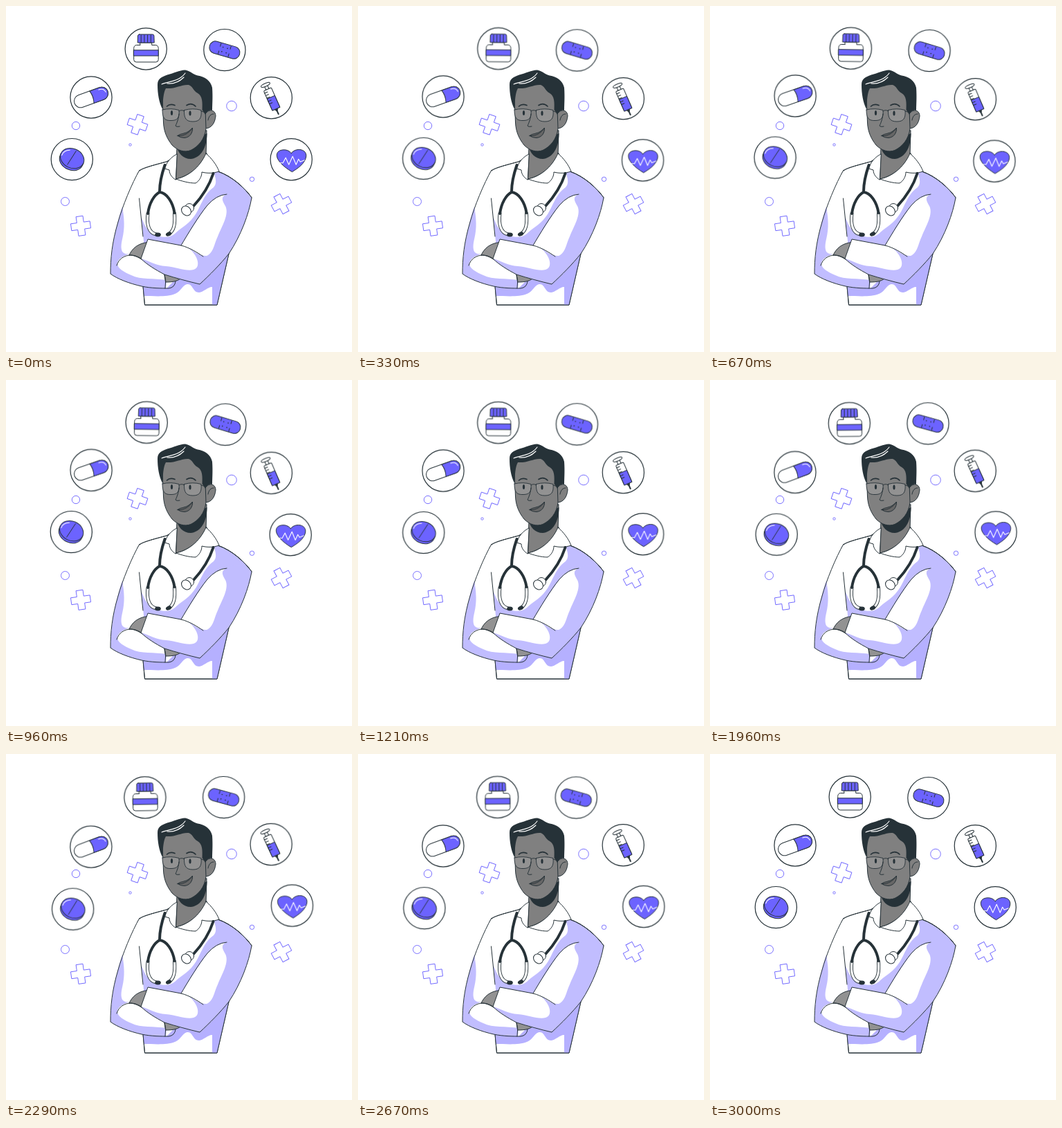
These frames come from a looping animation (500 by 500 pixels, 3040 ms). An HTML page:

```html
<!DOCTYPE html>
<html lang="en">
<head>
<meta charset="utf-8">
<title>Doctor</title>
<style>
  html, body { margin: 0; width: 100%; height: 100%; overflow: hidden; background: #fff; }
  svg { display: block; width: 100%; height: 100%; }
  .line { fill: none; }
  .ink { stroke: #263238; stroke-width: 1; stroke-linecap: round; stroke-linejoin: round; }
  .dark { fill: #263238; }
  .white { fill: #fff; }
  .violet { fill: #6c63ff; }
  .shade { fill: #c1bdff; }
  .deep { fill: #b5b0ff; }
  .skin { fill: #808080; }
  .hand { fill: #929292; }
  .spark { fill: #fff; stroke: #6c63ff; stroke-width: .9; }
  .gleam { fill: none; stroke: #fff; stroke-width: 1.1; stroke-linecap: round; stroke-linejoin: round; }
  .tube { fill: none; stroke: #263238; stroke-width: 4; stroke-linecap: round; }
  .icons { transform-origin: 253.8px 141.8px; animation: sway 3.04s linear infinite; }
  /* a three second swing, then a short rest */
  @keyframes sway {
    0%, 98.684%, 100% { transform: rotate(0deg); }
    24.671% { transform: rotate(1deg); }
    74.013% { transform: rotate(-1deg); }
  }
</style>
</head>
<body>
<svg viewBox="0 0 500 500">
  <defs>
    <path id="cross" d="M-5-14H5V-5H14V5H5V14H-5V5H-14V-5H-5Z"/>
    <circle id="ring" r="30.1" style="stroke-width:1.2"/>
    <path id="torso" d="M232 225C217 229 197 234 193 238C187 246 184 262 190 290L198 405L200.500 432H305L322 358L355 277C346 264 327 246 306 239L289 212L246 217Z"/>
    <clipPath id="inTorso"><use href="#torso"/></clipPath>
  </defs>

  <g class="spark">
    <use href="#cross" transform="translate(190 171.300) rotate(19)"/>
    <use href="#cross" transform="translate(108 317.800) rotate(-8)"/>
    <use href="#cross" transform="translate(398 286) rotate(-28)"/>
    <circle cx="326" cy="144.500" r="7.300"/>
    <circle cx="101" cy="173" r="5.700"/>
    <circle cx="85.500" cy="282.500" r="6"/>
    <circle cx="179.500" cy="200.500" r="1.700"/>
    <circle cx="355.500" cy="250.300" r="3.200"/>
  </g>

  <g class="icons">
    <g transform="translate(95.300 221.600)">
      <use href="#ring" class="white ink"/>
      <g transform="rotate(24)">
        <path class="violet ink" d="M-18-2V1.500C-18 9.500-10 15.500 0 15.500S17.500 9.500 17.500 1.500V-2Z"/>
        <ellipse class="violet ink" cx="-.3" cy="-1.500" rx="17.700" ry="14"/>
      </g>
      <path class="line ink" d="M-6.500 7.500L6-12"/>
      <path class="gleam" d="M-14.500-6C-13-11-8-13.500-3-13.300"/>
    </g>

    <g transform="translate(123 132)">
      <use href="#ring" class="white ink"/>
      <g transform="rotate(-20)">
        <rect class="white ink" x="-25.500" y="-9.300" width="51" height="18.600" rx="9.300"/>
        <path class="violet ink" d="M1-9.300H16.200A9.300 9.300 0 0 1 16.200 9.300H1Q4 0 1-9.300Z"/>
        <path class="gleam" d="M14-6.500C19-6.500 22-4 22.500 0"/>
      </g>
    </g>

    <g transform="translate(202.200 62)">
      <use href="#ring" class="white ink"/>
      <path class="white ink" d="M-8.500-9H8.500V-5.500H14C17-5.500 18-3 18-.5V15.500Q18 19 14.500 19H-14Q-17.500 19-17.500 15.500V-.5C-17.500-3-16.500-5.500-13.500-5.500H-8.500Z"/>
      <path class="violet ink" d="M-17.500 1.800H18V10H-17.500Z"/>
      <path class="violet ink" d="M-9.500-21H9.500Q11.500-21 11.700-19L12-9H-12L-11.700-19Q-11.500-21-9.500-21Z"/>
      <path class="line ink" d="M-7-20V-9.500M-2.300-20V-9.500M2.400-20V-9.500M7.100-20V-9.500"/>
    </g>

    <g transform="translate(315.900 63.600)">
      <use href="#ring" class="white ink"/>
      <g transform="rotate(16)">
        <rect class="violet ink" x="-22.500" y="-8.900" width="45" height="17.800" rx="8.600"/>
        <path class="line ink" stroke-dasharray="4.500 7" d="M-7.500-8V8M7.500-8V8"/>
        <g class="dark">
          <circle cx="-3.300" cy="-3.300" r=".8"/><circle cx="3.300" cy="-3.300" r=".8"/>
          <circle cx="-3.300" cy="3.300" r=".8"/><circle cx="3.300" cy="3.300" r=".8"/>
        </g>
      </g>
    </g>

    <g transform="translate(383.300 132.700)">
      <use href="#ring" class="white ink"/>
      <g transform="rotate(-24)">
        <path class="white ink" d="M-2.300-20H2.300V-13H-2.300Z"/>
        <ellipse class="white ink" cy="-20.500" rx="7" ry="2.200"/>
        <rect class="white ink" x="-6" y="-13.500" width="12" height="31" rx="1.500"/>
        <path class="violet ink" d="M-6-1H6V17.500H-6Z"/>
        <path class="dark ink" d="M-2 18H2L.5 21V26H-.5V21Z"/>
        <path class="line ink" d="M-6-10H-1.500M-6-6H-1.500M-6-2H-1.500M-6 3H-1.500M-6 7H-1.500"/>
      </g>
    </g>

    <g transform="translate(412.200 221.700)">
      <use href="#ring" class="white ink"/>
      <path class="violet ink" d="M0-9C4-14.500 13-16 18.500-12C24-7.500 21.500 0 16.500 6C11.500 12 5 15.500 1.300 18C-5 14.500-14 8-18.500 1C-23-6-21-12-14-13.500C-8-14.700-3-13 0-9Z"/>
      <path class="gleam" d="M-17 5H-12L-8-2.500L-3.500 7.500L2-4.500L7 7.500L10.500-.5L13 3.500L19 1"/>
    </g>
  </g>

  <g>
    <use href="#torso" class="white ink"/>
    <g clip-path="url(#inTorso)">
      <path class="shade" d="M300 239L310 236L362 275L330 350H190V296C198 306 199 321 211 328C221 334 235 337 244 329C252 321 262 317 271 305C281 293 284 273 300 262C306 256 302 246 300 239Z"/>
      <path class="deep" d="M194 395H280L325 355L305 433H298V406C293 405 286 413 279 414C270 414 270 402 263 402C255 402 254 412 244 416C232 421 214 419 199 419Z"/>
    </g>
    <use href="#torso" class="line ink"/>
  </g>

  <!-- arm on the left, with both hands -->
  <path class="white" d="M193 237C182 256 168 290 162 312C153 342 151 365 151 387C160 394 178 401 196 405C210 408 225 408 232 408L244 396L229 386L196 366L199 340L193 278Z"/>
  <path class="shade" d="M168 290C156 327 151 358 151 387C160 394 178 401 196 405C208 408 223 408 231 408L232 396C214 393 195 396 181 389C170 384 162 380 161 373C160 366 170 361 178 358C166 360 165 350 168 337C172 321 171 307 168 290Z"/>
  <path class="line ink" d="M193 237C182 256 168 290 162 312C153 342 151 365 151 387C160 394 178 401 196 405C210 408 225 408 235 408Q244 407 245 398"/>
  <path class="line ink" d="M192.500 278L198 333"/>
  <path class="hand ink" d="M178 360C182 351 190 343 205 341.500L197 367C190 362 184 360 178 360Z"/>
  <path class="hand ink" d="M229 387L253 393C249 397 243 399 231 399Z"/>
  <path class="line ink" d="M160 375C163 365 171 360.500 180 360C188 360 194 364 200 368"/>
  <path class="line ink" d="M229 387Q232 397 230 408"/>

  <!-- arm on the right -->
  <path class="white" d="M318 272C336 266 350 270 355 277C351 300 340 331 322 358C310 373 294 389 280 402C263 398 245 393 229 388C216 381 204 374 195 365L205 337L253 346C262 331 278 306 291 288Q302 275 318 272Z"/>
  <path class="shade" d="M318 272C336 262 351 271 355 277C351 300 340 331 322 358C310 373 294 389 280 402C263 398 245 393 229 388C216 381 204 374 195 365C208 369 217 375 231 376C246 377 261 384 271 381C282 378 278 361 264 350C274 356 282 362 290 361C300 357 301 343 306 333C312 318 323 301 317 289C314 283 309 277 318 272Z"/>
  <path class="line ink" d="M306 239C327 246 346 264 355 277C351 300 340 331 322 358C310 373 294 389 280 402C263 398 245 393 229 388C216 381 204 374 195 365L205 337L253 346C265 349 276 356 285 362"/>
  <path class="line ink" d="M253 346C263 329 278 304 291 288Q304 273 319 272"/>

  <!-- neck and collar -->
  <path class="skin ink" d="M247 202L245.500 250C259 247 278 237 289 216L290 180Z"/>
  <path class="dark" d="M246.500 201C248 213 256 221 267 221C279 220 290 209 290.500 184L281 188Z"/>
  <path class="white ink" d="M247 214C239 218 232 225 229.500 235L236 237C236 243 240 248 245 251Z"/>
  <path class="white ink" d="M289 213C297 220 304 229 308 239C299 242 291 242 283 240C283 247 279 253 274 256C264 256 254 253 245.500 250C262 247 280 234 289 213Z"/>

  <!-- head -->
  <path class="skin ink" d="M288 156C294 147 303 151 303 159C302 169 297 177 288 177Z"/>
  <path class="line ink" d="M292 165C293 159 296 156 300 156"/>
  <path class="skin ink" d="M226 130L227.500 168C228 182 233 192 240 201C248 209 258 212 267 208.500C278 203 287 193 289 177L287 120L258 106L229 117Z"/>
  <path class="dark" d="M226 149C221 139 219 126 219 114C219 105 224 103 233 99.500C243 97 250 93 259 92.500C267 94 270 99 277 100.500C287 102 296 108 298 118C299 132 298 143 298 151C293 150 290 153 288 157L283.500 150C284 139 284 130 277 126C270 122 270 116 264 114C254 113 245 120 231 119C227 126 227 137 226 149Z"/>
  <path class="gleam" stroke-width=".9" d="M225 113C235 109 246 109 253 103Q257 100 259 97M233 112C244 113 252 108 257 103"/>
  <g class="ink" fill="#929292" style="stroke-width:.9">
    <path d="M226 150Q238 147 250 150.500C251 161 248 165.500 239 165.500C229 166 226 162 226 150Z"/>
    <path d="M257.500 150.500Q270 147 282 150.500C283 162 280 167 270 167C260 167 257 162 257.500 150.500Z"/>
    <path class="line" d="M250 152Q254 149 257.500 152M282 152L289 154"/>
  </g>
  <ellipse class="dark" cx="239.500" cy="154.500" rx="1.600" ry="3.600"/>
  <ellipse class="dark" cx="266" cy="155" rx="1.600" ry="3.600"/>
  <path class="line ink" style="stroke-width:1.700" d="M232.500 145Q237 140.500 244 143.500M261 143.500Q268 139 274 145"/>
  <path class="line ink" d="M250 156C249 164 247 169 245 173Q246 175 251 174"/>
  <path class="ink" fill="#666" d="M248 187.500C251 185 254 185 257 184C262 183 266 180 269.500 176C270 184 265 190 258 190.500Q252 190.500 248 187.500Z"/>
  <path class="line ink" d="M248 187.500C257 188 264 184 269 177"/>

  <!-- stethoscope -->
  <path class="tube" d="M229.500 230C225 243 222 255 222 268"/>
  <path class="tube" d="M299.500 242C294 259 283 276 271 289"/>
  <path class="line ink" style="stroke-width:5" d="M205 300C203 315 206 328 217 330M243.500 300C244.500 315 243 324 236 329"/>
  <path class="gleam" style="stroke-width:3.200" d="M205 300C203 315 206 328 217 330M243.500 300C244.500 315 243 324 236 329"/>
  <path class="tube" d="M205 300C207 285 214 273 222 269C232 270 241 283 243.500 299"/>
  <ellipse class="dark" cx="219.500" cy="330.500" rx="4.300" ry="3"/>
  <ellipse class="dark" cx="235" cy="329.500" rx="4.300" ry="2.800" transform="rotate(-25 235 329.500)"/>
  <circle class="white ink" cx="265" cy="292" r="6.500"/>
  <ellipse class="white ink" cx="260.500" cy="296" rx="6.300" ry="7.500" transform="rotate(-45 260.500 296)"/>
</svg>
</body>
</html>
```
